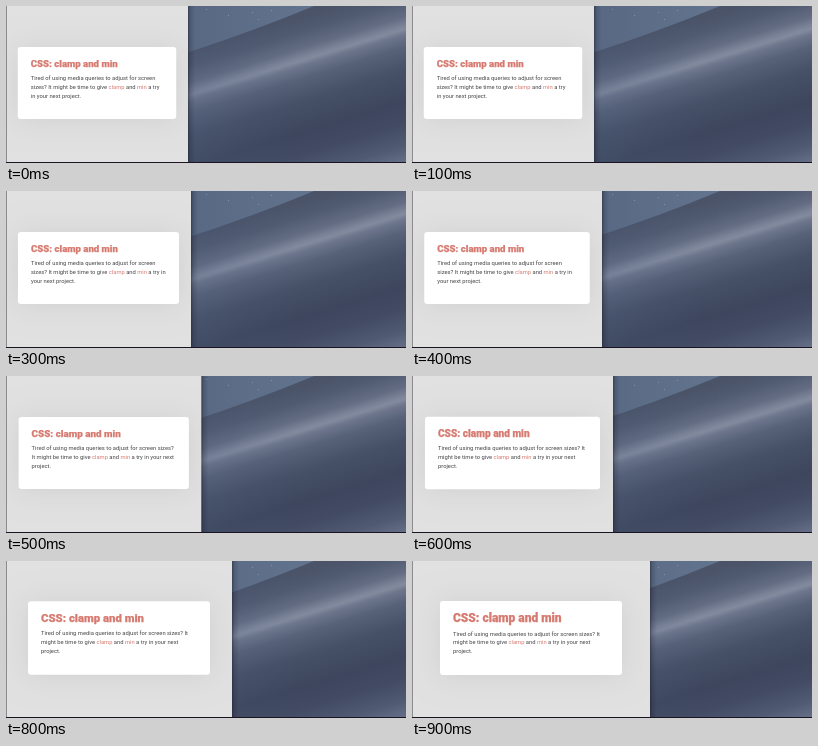
An HTML page with a canvas for the animation above (1 s loop, 400 by 157 pixels).

```html
<!DOCTYPE html>
<html lang="en">
<head>
<meta charset="utf-8">
<title>CSS: clamp and min</title>
<style>
  html, body { margin: 0; width: 100%; height: 100%; overflow: hidden; background: #191420; }
  canvas { display: block; width: 400px; height: 157px; }
</style>
</head>
<body>
<canvas id="stage"></canvas>
<script>
const W = 400, H = 157, FLOOR = 156, STEP = 100;
const canvas = document.getElementById('stage');
const ctx = canvas.getContext('2d');
const dpr = window.devicePixelRatio || 1;
canvas.width = W * dpr;
canvas.height = H * dpr;

// Width of the dragged window at each step
const widths = [182, 182, 182, 185, 190, 195.5, 201, 212, 226, 238];
const ACCENT = '#d67a70', INK = '#444448';
const words = ('Tired of using media queries to adjust for screen sizes? ' +
  'It might be time to give clamp and min a try in your next project.').split(' ');

function gradient(x0, y0, x1, y1, stops) {
  const g = ctx.createLinearGradient(x0, y0, x1, y1);
  stops.forEach(([at, color]) => g.addColorStop(at, color));
  return g;
}

function drawWallpaper() {
  // Dune: bands running along a slope
  ctx.save();
  ctx.transform(1, -0.307, 0, 1, 0, 0.307 * 182);
  ctx.fillStyle = gradient(0, 0, 0, 224, [
    [0, '#4a5368'], [0.2, '#4a5368'], [0.27, '#505a70'], [0.345, '#636c82'],
    [0.385, '#7c8499'], [0.4, '#828a9e'], [0.425, '#6c758b'], [0.48, '#576178'],
    [0.58, '#465067'], [0.72, '#3d465d'], [0.82, '#424b63'], [0.92, '#505a73'], [1, '#667089']
  ]);
  ctx.fillRect(0, -70, W, 360);
  ctx.restore();

  // Cooler light at the foot of the slope
  ctx.fillStyle = gradient(180, 0, 290, 0, [[0, 'rgba(76,96,128,.25)'], [1, 'rgba(76,96,128,0)']]);
  ctx.fillRect(180, 0, 110, FLOOR);

  // Sky
  ctx.fillStyle = gradient(182, 0, 300, 0, [[0, '#586883'], [1, '#62738d']]);
  ctx.beginPath();
  ctx.moveTo(180, 0);
  ctx.lineTo(308, 0);
  ctx.quadraticCurveTo(245, 26, 180, 47);
  ctx.fill();
  ctx.fillStyle = 'rgba(205,218,235,.35)';
  [[200, 3], [222, 9], [246, 6], [265, 4], [252, 13]].forEach(([x, y]) => ctx.fillRect(x, y, 1, 1));
}

function roundRect(x, y, w, h, r) {
  ctx.beginPath();
  ctx.roundRect(x, y, w, h, r);
  ctx.fill();
}

function drawHeading(x, baseline, size) {
  ctx.fillStyle = ctx.strokeStyle = ACCENT;
  ctx.lineWidth = 0.25;
  ctx.font = `900 ${size}px Roboto, sans-serif`;
  ctx.fillText('CSS: clamp and min', x, baseline);
  ctx.strokeText('CSS: clamp and min', x, baseline);
}

function drawParagraph(left, baseline, room) {
  ctx.font = '5.8px Roboto, sans-serif';
  const space = ctx.measureText(' ').width;
  let x = 0;
  for (const word of words) {
    const width = ctx.measureText(word).width;
    if (x + width > room) {
      x = 0;
      baseline += 8.8;
    }
    ctx.fillStyle = word === 'clamp' || word === 'min' ? ACCENT : INK;
    ctx.fillText(word, left + x, baseline);
    x += width + space;
  }
}

function drawCard(win) {
  const size = Math.max(9.6, win * 0.0503);
  const grow = size - 9.6;
  const w = Math.min(182, win * 0.871);
  const h = 72 + grow * 0.8;
  const x = (win - w) / 2, y = 77 - h / 2;

  ctx.save();
  ctx.shadowColor = 'rgba(0,0,0,.08)';
  ctx.shadowBlur = 28 * dpr;
  ctx.shadowOffsetY = dpr;
  ctx.fillStyle = '#fff';
  roundRect(x, y, w, h, 3);
  ctx.restore();

  drawHeading(x + 13, 61, size);
  drawParagraph(x + 13, 74 + grow * 0.25, w - 26);
}

function drawWindow(win) {
  ctx.fillStyle = gradient(win, 0, win + 7, 0, [[0, 'rgba(20,22,36,.5)'], [0.3, 'rgba(20,22,36,.2)'], [1, 'rgba(20,22,36,0)']]);
  ctx.fillRect(win, 0, 7, FLOOR);

  ctx.save();
  ctx.beginPath();
  ctx.rect(0, 0, win, FLOOR);
  ctx.clip();
  ctx.fillStyle = '#e1e1e1';
  ctx.fillRect(0, 0, win, FLOOR);
  drawCard(win);
  ctx.restore();

  ctx.fillStyle = '#77777c';
  ctx.fillRect(0, 0, 0.8, FLOOR);
}

function draw(now) {
  const step = Math.floor(now / STEP) % widths.length;
  ctx.setTransform(dpr, 0, 0, dpr, 0, 0);
  drawWallpaper();
  drawWindow(widths[step]);
  ctx.fillStyle = '#191420';
  ctx.fillRect(0, FLOOR, W, H - FLOOR);
  requestAnimationFrame(() => draw(performance.now()));
}

draw(0);
</script>
</body>
</html>
```
